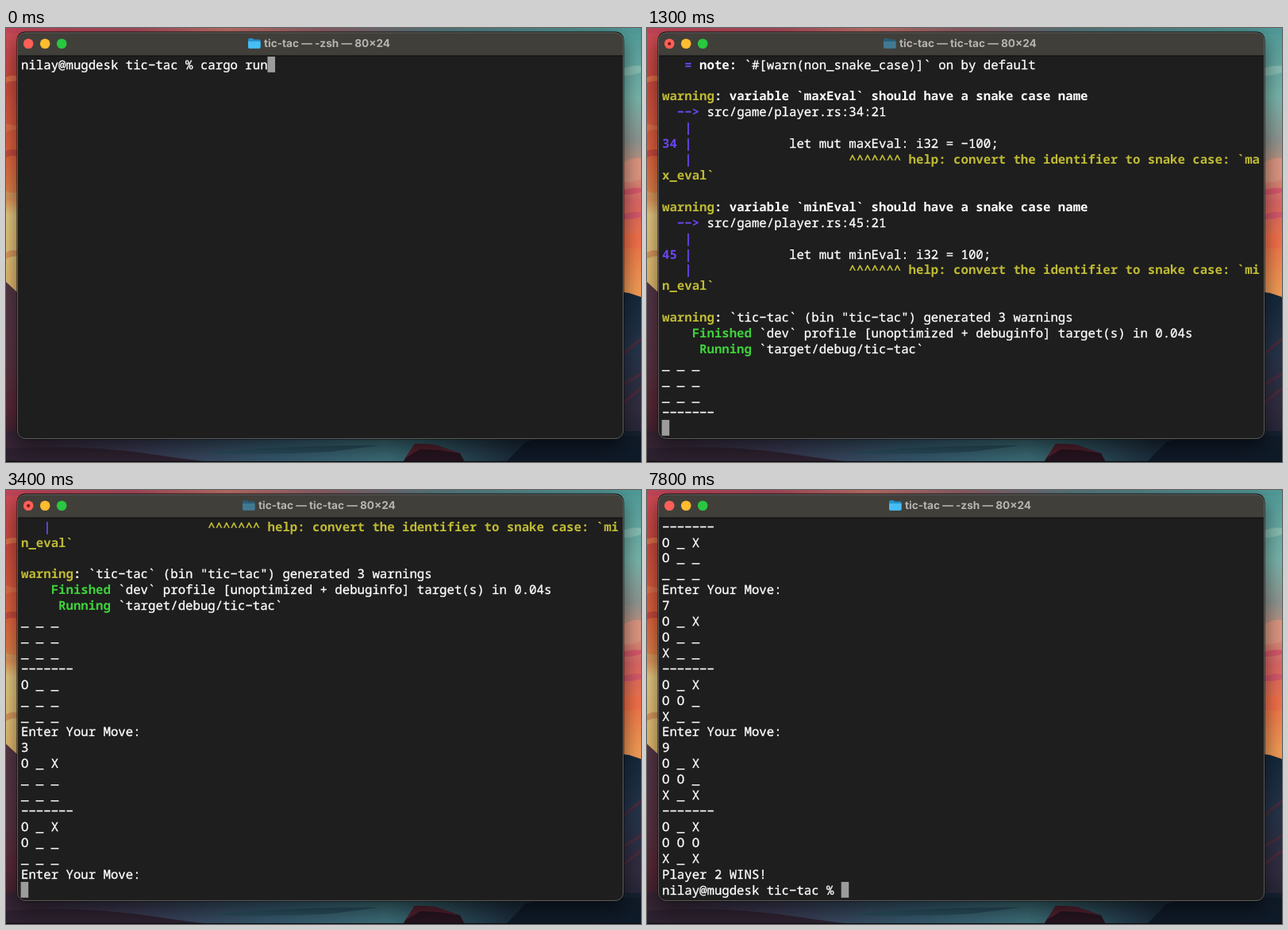
Write an HTML page that moves like this. It is 800 px wide and 547 px high and loops after 8.24 s.

```html
<!DOCTYPE html>
<html lang="en">
<head>
<meta charset="utf-8">
<title>Terminal game</title>
<style>
  html, body { margin: 0; width: 100%; height: 100%; overflow: hidden; background: #10141c; }
  svg { display: block; width: 800px; height: 547px; }
  text { white-space: pre; text-rendering: geometricPrecision; }
  #rows { font: 15.7px "Noto Sans Mono", monospace; fill: #fff; stroke: #fff; stroke-width: .3px; }
  #title { font: 700 13.6px Inter, sans-serif; fill: #b6b4b1; }
  .b, .y, .p, .g { font-weight: 700; stroke: none; }
  .y { fill: #bfba34; }
  .p { fill: #6b46f2; }
  .g { fill: #3fd03c; }
  .window { filter: drop-shadow(0 10px 13px rgba(0, 0, 0, .55)); }
</style>
</head>
<body>
<svg viewBox="0 0 800 547">
  <defs>
    <linearGradient id="left" x2="0" y2="1">
      <stop offset="0" stop-color="#cb4a58"/>
      <stop offset=".12" stop-color="#cc4a3e"/>
      <stop offset=".3" stop-color="#e5663f"/>
      <stop offset=".38" stop-color="#e2834a"/>
      <stop offset=".43" stop-color="#e9cd83"/>
      <stop offset=".6" stop-color="#e6bd70"/>
    </linearGradient>
    <linearGradient id="right" x2="0" y2="1">
      <stop offset="0" stop-color="#4f9a98"/>
      <stop offset=".16" stop-color="#78b5ab"/>
      <stop offset=".26" stop-color="#8f9590"/>
      <stop offset=".34" stop-color="#d79078"/>
      <stop offset=".4" stop-color="#db6766"/>
      <stop offset=".5" stop-color="#f0774a"/>
      <stop offset=".6" stop-color="#f29b56"/>
    </linearGradient>
    <linearGradient id="top">
      <stop offset="0" stop-color="#c04558"/>
      <stop offset=".2" stop-color="#a84a5c"/>
      <stop offset=".35" stop-color="#bd7067"/>
      <stop offset=".5" stop-color="#8e5f68"/>
      <stop offset=".68" stop-color="#55797d"/>
      <stop offset="1" stop-color="#4f9a98"/>
    </linearGradient>
    <linearGradient id="slope" x2="0" y2="1">
      <stop offset="0" stop-color="#543747"/>
      <stop offset=".45" stop-color="#5b3444"/>
      <stop offset=".7" stop-color="#5a2938"/>
      <stop offset="1" stop-color="#2b1e2d"/>
    </linearGradient>
    <linearGradient id="cliff" x2="0" y2="1">
      <stop offset="0" stop-color="#14283a"/>
      <stop offset=".35" stop-color="#26344a"/>
      <stop offset=".7" stop-color="#322c3f"/>
      <stop offset="1" stop-color="#16202e"/>
    </linearGradient>
    <linearGradient id="bottom">
      <stop offset="0" stop-color="#382535"/>
      <stop offset=".2" stop-color="#383850"/>
      <stop offset=".42" stop-color="#34566a"/>
      <stop offset=".6" stop-color="#3b6c76"/>
      <stop offset=".8" stop-color="#1c2c3c"/>
      <stop offset="1" stop-color="#15202f"/>
    </linearGradient>
  </defs>

  <rect width="400" height="547" fill="url(#left)"/>
  <rect x="400" width="400" height="547" fill="url(#right)"/>
  <rect width="800" height="7" fill="url(#top)"/>
  <g fill="#e0704a">
    <path d="M0 62q8-4 20 0v6q-10-3-20 1zM0 120q9 5 20 2v8q-9-4-20 1z"/>
    <path d="M0 155q9-5 20 2v6q-12-4-20 0z" fill="#c84c40"/>
    <path d="M0 205q9 6 20 0v8q-9 5-20 1zM0 283q9-6 20 0v6q-9-4-20 2z" fill="#dc9a5e"/>
    <path d="M775 172q12-10 25-8v26q-14 6-25 4z" fill="#db9680"/>
    <path d="M775 205q14-5 25-3v5q-14 4-25 3zM775 236q13-6 25-4v6q-14 4-25 3z" fill="#d4586a"/>
    <path d="M775 262q12-5 25 0v13q-12 5-25 1z" fill="#f2704a"/>
    <path d="M775 52q13-6 25-4v8q-13 5-25 4z" fill="#86bdb2"/>
  </g>
  <path d="M0 320L14 333 40 360V547H0z" fill="url(#slope)"/>
  <path d="M770 332L785 334 800 339V547H770z" fill="url(#cliff)"/>
  <g fill="none" stroke="#4c2b3b" stroke-width="3">
    <path d="M776 412L800 392M776 450L800 436M776 474L800 454"/>
  </g>
  <rect y="508" width="800" height="39" fill="url(#bottom)"/>
  <path d="M0 530Q100 524 190 538T300 547H0z" fill="#2d2230"/>
  <path d="M250 536q90-10 220-10l-60 8q-70 4-160 2z" fill="#294d5c"/>
  <path d="M500 547L515 524 540 525 572 536 578 547z" fill="#26141f"/>
  <path d="M503 542L515 524 540 525 572 536 545 532 522 531z" fill="#51202e"/>
  <path d="M630 547L655 521 690 514H800V547z" fill="#101b29"/>
  <rect y="546" width="800" height="1" fill="#07090c"/>

  <g class="window">
    <rect x="13.5" y="4.5" width="765" height="514" rx="10.5" fill="#080808"/>
    <rect x="14" y="5.5" width="764" height="512.5" rx="10" fill="#1e1e1e"/>
  </g>
  <path d="M14 35V15.5a10 10 0 0 1 10-10H768a10 10 0 0 1 10 10V35z" fill="#413f3a"/>
  <path d="M14 35H778" stroke="#0c0c0c"/>
  <rect x="14.5" y="6" width="763" height="511.5" rx="9.5" fill="none" stroke="#5c5c5a"/>
  <circle cx="28.2" cy="19.8" r="6.3" fill="#ff5f57"/>
  <circle cx="49.2" cy="19.8" r="6.3" fill="#febc2e"/>
  <circle cx="70.2" cy="19.8" r="6.3" fill="#28c840"/>
  <circle id="busy" cx="28.2" cy="19.8" r="2.1" fill="#7c1510"/>

  <g id="folder">
    <path d="M0 2q0-2 2-2h3.5l2 1.6H14q1.6 0 1.6 1.6V11q0 1.8-1.8 1.8H1.8Q0 12.8 0 11z" fill="#2492cf"/>
    <path d="M0 4H15.6V11q0 1.8-1.8 1.8H1.8Q0 12.8 0 11z" fill="#46bdf4"/>
  </g>
  <text id="title" y="24.3"></text>
  <path id="marks" d="M18 40.5H15.5V52H18M773 40.5H775.5V52H773" fill="none" stroke="#858585"/>
  <rect id="cursor" width="9.6" height="19.9" fill="#9d9c9c"/>
  <g id="rows"></g>
</svg>
<script>
const LOOP = 8240, ROWS = 24, CELL = 9.42, PITCH = 19.91, LEFT = 19, BASE = 51.6;
const $ = id => document.getElementById(id);

const prompt = "nilay@mugdesk tic-tac % ";
const rule = "-------", ask = "Enter Your Move:";
const board = cells => [0, 3, 6].map(i => [...cells.slice(i, i + 3)].join(" "));

// Segments are split by "¦"; a leading "y~" style prefix picks the colour class.
const lint = (line, name, value, head, tail) => [
  `y~warning¦b~: variable \`${name}\` should have a snake case name`,
  `p~  --> ¦src/game/player.rs:${line}:21`,
  "p~   |",
  `p~${line} |¦${" ".repeat(13)}let mut ${name}: i32 = ${value};`,
  `p~   |¦y~${" ".repeat(21)}^^^^^^^ help: convert the identifier to snake case: \`${head}`,
  `y~${tail}\``,
  ""
];

const log = [
  "p~   = ¦b~note: ¦`#[warn(non_snake_case)]` on by default",
  "",
  ...lint(34, "maxEval", -100, "ma", "x_eval"),
  ...lint(45, "minEval", 100, "mi", "n_eval"),
  "y~warning¦b~:¦ `tic-tac` (bin \"tic-tac\") generated 3 warnings",
  "g~    Finished¦ `dev` profile [unoptimized + debuginfo] target(s) in 0.04s",
  "g~     Running¦ `target/debug/tic-tac`",
  ...board("_________"), rule,
  ...board("O________"), ask,
  "3", ...board("O_X______"), rule,
  ...board("O_XO_____"), ask,
  "7", ...board("O_XO__X__"), rule,
  ...board("O_XOO_X__"), ask,
  "9", ...board("O_XOO_X_X"), rule,
  ...board("O_XOOOX_X"), "Player 2 WINS!"
];

const shell = { name: "-zsh", x: 325, busy: false };
const cargo = { name: "cargo run", x: 308, busy: true };
const game = { name: "tic-tac", x: 318, busy: true };
const shown = count => log.slice(0, count);

// start time, running process, finished lines, line holding the cursor
const steps = [
  [0, shell, [], prompt + "cargo run"],
  [900, cargo, [prompt + "cargo run"], ""],
  [1200, game, shown(23), ""],
  [1900, game, shown(27), ""],
  [2200, game, shown(27), "3"],
  [2500, game, shown(32), ""],
  [2600, game, shown(36), ""],
  [3900, game, shown(36), "7"],
  [4300, game, shown(45), ""],
  [6100, game, shown(45), "9"],
  [6700, shell, shown(54), prompt]
];

function svg(tag, attrs, parent) {
  const node = document.createElementNS("http://www.w3.org/2000/svg", tag);
  for (const key in attrs) node.setAttribute(key, attrs[key]);
  return parent.appendChild(node);
}

function drawLine(line, row) {
  const text = svg("text", { x: LEFT, y: BASE + row * PITCH }, $("rows"));
  for (const part of line.split("¦")) {
    const [, style = "", words] = part.match(/^(?:([bypg])~)?(.*)$/);
    // the terminal face has wide hyphens
    svg("tspan", { class: style }, text).textContent = words.replace(/-/g, "\u2212");
  }
}

function draw([, process, done, current]) {
  const view = [...done, current].slice(-ROWS);
  $("rows").replaceChildren();
  view.forEach(drawLine);
  $("cursor").setAttribute("x", LEFT - .4 + current.length * CELL);
  $("cursor").setAttribute("y", 36 + (view.length - 1) * PITCH);
  $("title").textContent = `tic-tac — ${process.name} — 80×24`;
  $("title").setAttribute("x", process.x);
  $("folder").setAttribute("transform", `translate(${process.x - 20} 13)`);
  $("folder").style.filter = process.busy ? "brightness(.66) saturate(.7)" : "none";
  $("busy").style.display = process.busy ? "" : "none";
  $("marks").style.display = process === cargo ? "" : "none";
}

const start = performance.now();
let active;
function tick() {
  const time = (performance.now() - start) % LOOP;
  const step = steps.findLast(([at]) => at <= time);
  if (step !== active) draw(active = step);
  requestAnimationFrame(tick);
}
tick();
</script>
</body>
</html>
```
